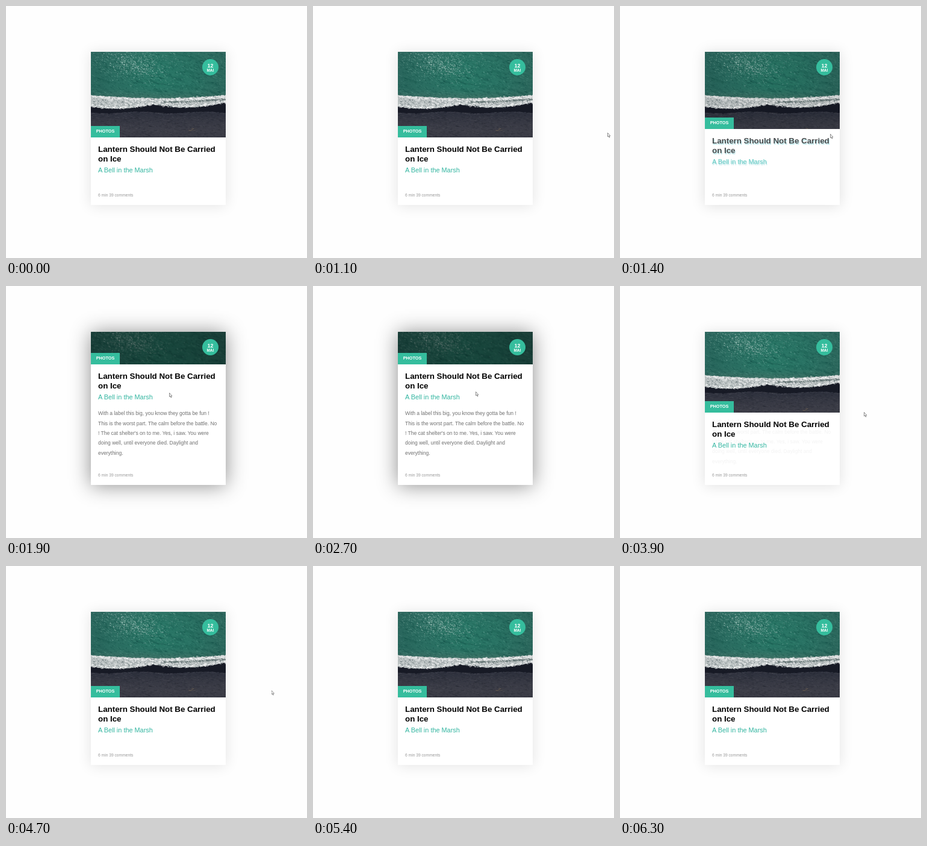
An HTML page with a canvas that plays this animation: 500x418 px, repeating every 6500 ms.

```html
<!DOCTYPE html>
<html lang="en">
<head>
<meta charset="utf-8">
<title>Article card</title>
<style>
  html, body { margin: 0; width: 100%; height: 100%; overflow: hidden; }
  body { position: relative; background: #fefefe; font-family: "Liberation Sans", Arial, sans-serif; white-space: nowrap; }
  .card, .card * { position: absolute; margin: 0; }
  .card {
    left: 141px; top: 76px; width: 224px; height: 254px;
    overflow: hidden; background: #000; box-shadow: var(--shadow);
    animation: hover 6.5s step-end infinite;
  }
  canvas { left: 0; top: 0; opacity: var(--dim); transform: scale(var(--zoom)); transform-origin: 134px 90px; }
  .date {
    left: 184.7px; top: 11.6px; width: 27.4px; height: 27.4px; border-radius: 50%;
    background: #35bd9d; color: #fff; font-weight: bold; text-align: center;
  }
  .date span { left: 0; width: 100%; }
  .day { top: 6px; font-size: 9px; line-height: 10px; }
  .month { top: 15px; font-size: 6.4px; line-height: 7px; }
  .content { left: 0; top: 142px; width: 224px; height: 220px; background: #fff; transform: translateY(calc(0px - var(--lift))); }
  .tag {
    left: 0; top: -19px; width: 48px; height: 19px; background: #35bd9d; color: #fff;
    font: bold 7.3px/18.5px "Liberation Sans", Arial, sans-serif; text-align: center;
  }
  h1, h2 { left: 12px; text-shadow: var(--glow); z-index: 2; }
  h1 { top: 12px; font-size: 13.33px; line-height: 16px; color: var(--title); }
  h2 { top: 47px; font-size: 10.9px; line-height: 14px; font-weight: normal; color: var(--sub); }
  .body {
    left: 12px; top: 127.2px; font-size: 8.51px; line-height: 16.35px; color: #707070;
    opacity: var(--text); transform: translateY(var(--drop)); z-index: 1;
  }
  .meta { left: 12px; top: 234px; font-size: 6.7px; line-height: 8px; color: #999; z-index: 1; }
  .cursor { position: absolute; left: 0; top: 0; opacity: 0; animation: point 6.5s step-end infinite; }

  @keyframes hover {
    0%, 63.077%, 100% {
      --lift: 0px; --dim: 1; --zoom: 1; --text: 0; --drop: 0px; --title: #000; --sub: #32b5a0;
      --glow: none; --shadow: 0 1px 22px rgba(0, 0, 0, .11);
    }
    21.538% {
      --lift: 14px; --dim: .95; --zoom: 1; --text: 0; --drop: 0px; --title: #484b4d; --sub: #5fc8c0;
      --glow: 1px 2px 1px rgba(100, 200, 205, .5); --shadow: 0 1px 22px rgba(0, 0, 0, .13);
    }
    29.231% {
      --lift: 88px; --dim: .6; --zoom: 1.1; --text: 1; --drop: 0px; --title: #000; --sub: #32b5a0;
      --glow: none; --shadow: 0 1px 32px rgba(0, 0, 0, .45);
    }
    60% {
      --lift: 8px; --dim: 1; --zoom: 1; --text: .08; --drop: 14px; --title: #000; --sub: #32b5a0;
      --glow: none; --shadow: 0 1px 22px rgba(0, 0, 0, .12);
    }
  }
  @keyframes point {
    0%, 75.385%, 100% { opacity: 0; transform: translate(489px, 210px); }
    16.923% { opacity: 1; transform: translate(489px, 210px); }
    20% { opacity: 1; transform: translate(420px, 212px); }
    21.538% { opacity: 1; transform: translate(349px, 212px); }
    29.231% { opacity: 1; transform: translate(271px, 177px); }
    32.308% { opacity: 1; transform: translate(270px, 175px); }
    60% { opacity: 1; transform: translate(405px, 209px); }
    63.077% { opacity: 1; transform: translate(428px, 207px); }
    64.615% { opacity: 1; transform: translate(440.5px, 206px); }
  }
</style>
</head>
<body>
<div class="card">
  <canvas width="224" height="143"></canvas>
  <div class="date"><span class="day">12</span><span class="month">MAI</span></div>
  <div class="content">
    <div class="tag">PHOTOS</div>
    <h1>Lantern Should Not Be Carried<br>on Ice</h1>
    <h2>A Bell in the Marsh</h2>
  </div>
  <p class="body">With a label this big, you know they gotta be fun !<br>This is the worst part. The calm before the battle. No<br>! The cat shelter's on to me. Yes, i saw. You were<br>doing well, until everyone died. Daylight and<br>everything.</p>
  <div class="meta">6 min 39 comments</div>
</div>
<svg class="cursor" width="7" height="10" viewBox="0 0 7 10">
  <path d="M.5.5V6.8L1.9 5.6 3 8.1 4 7.7 2.9 5.3H4.8Z" fill="#fff" stroke="#444" stroke-width=".6"/>
</svg>
<script>
  const c = document.querySelector('canvas').getContext('2d');
  const W = 224, H = 143;
  let seed = 7;
  const rand = () => (seed = seed * 16807 % 2147483647) / 2147483647;
  const between = (a, b) => a + (b - a) * rand();
  const anyX = () => between(0, W);
  // Bell-shaped spread around a centre
  const around = (mid, spread) => mid + spread * (rand() + rand() + rand() - 1.5) / 1.5;

  function fill(x, y, w, h, x1, y1, ...colors) {
    const g = c.createLinearGradient(x, y, x1, y1);
    colors.forEach((color, i) => g.addColorStop(i / (colors.length - 1), color));
    c.fillStyle = g;
    c.fillRect(x, y, w, h);
  }

  // Short dashes scattered over a region
  function dashes(count, x, y, color, alpha, size, slope, thick = .8) {
    c.fillStyle = color;
    for (let i = 0; i < count; i++) {
      const px = x(), py = y(px);
      c.globalAlpha = alpha * rand();
      c.save();
      c.translate(px, py);
      c.rotate(slope);
      c.fillRect(0, 0, between(.5, size), thick);
      c.restore();
    }
    c.globalAlpha = 1;
  }

  function band(top, bottom, color, from = 0) {
    c.beginPath();
    for (let x = from; x <= W; x += 2) c.lineTo(x, top(x) + between(-.8, .8));
    for (let x = W; x >= from; x -= 2) c.lineTo(x, bottom(x) + between(-.8, .8));
    c.fillStyle = color;
    c.fill();
  }

  const foamTop = x => 72 + 5 * Math.sin(Math.PI * x / W);
  const foamEnd = x => 89 + 6 * Math.abs(Math.sin((x + 12) / 37)) - x * .018;
  const wetEnd = x => 101 + 1.5 * Math.sin(x / 17);
  const inSea = () => between(0, 74);
  const inFoam = x => between(foamTop(x), foamEnd(x));

  // Sea
  fill(0, 0, W, 100, W, 0, '#2a655c', '#2c7063', '#2a7867', '#2b7364', '#30685e');
  fill(0, 0, W, 100, 0, 82, 'rgba(60,105,100,.25)', 'rgba(32,110,95,.1)', 'rgba(30,110,95,.1)', 'rgba(85,110,104,.75)');
  dashes(160, anyX, inSea, '#0d4a42', .22, 26, .3, 2.5);
  dashes(1500, anyX, inSea, '#0f4a43', .5, 5, .4);
  dashes(800, anyX, inSea, '#6ba99a', .45, 4, .4);
  dashes(900, () => around(75, 95), x => around(20 + (x - 75) * .12, 42), '#a9cac1', .6, 2.5, .6);
  dashes(260, () => around(68, 60), x => around(20 + (x - 68) * .3, 28), '#f0f6f4', .9, 2, .6);

  // Sand
  fill(0, 88, W, H - 88, 0, H, '#20242f', '#2e313d', '#363843', '#3c3d47', '#393a44');
  dashes(1300, anyX, () => between(102, H), '#54555e', .4, 5, .1);
  dashes(900, anyX, () => between(100, H), '#1f222c', .5, 5, .1);
  dashes(25, () => between(162, 176), () => between(126, 132), '#8a765c', .5, 3, .1);

  // Surf
  band(x => foamEnd(x) - 2, wetEnd, '#171a25');
  dashes(260, anyX, x => wetEnd(x) + between(-1, 1), '#4a4c56', .6, 5, 0);
  band(foamTop, foamEnd, '#b9c0c0');
  band(x => foamTop(x) + 5, x => foamTop(x) + 8, '#6d7d7c', 120);
  dashes(900, anyX, inFoam, '#4c5b60', .7, 3.5, .9);
  dashes(800, anyX, inFoam, '#fff', .9, 4, .3);
  dashes(420, anyX, x => around(foamTop(x) + 2, 4), '#fff', 1, 5, .05);
  dashes(350, anyX, x => around(foamEnd(x) - 2, 4), '#fff', 1, 4, -.1);
</script>
</body>
</html>
```
